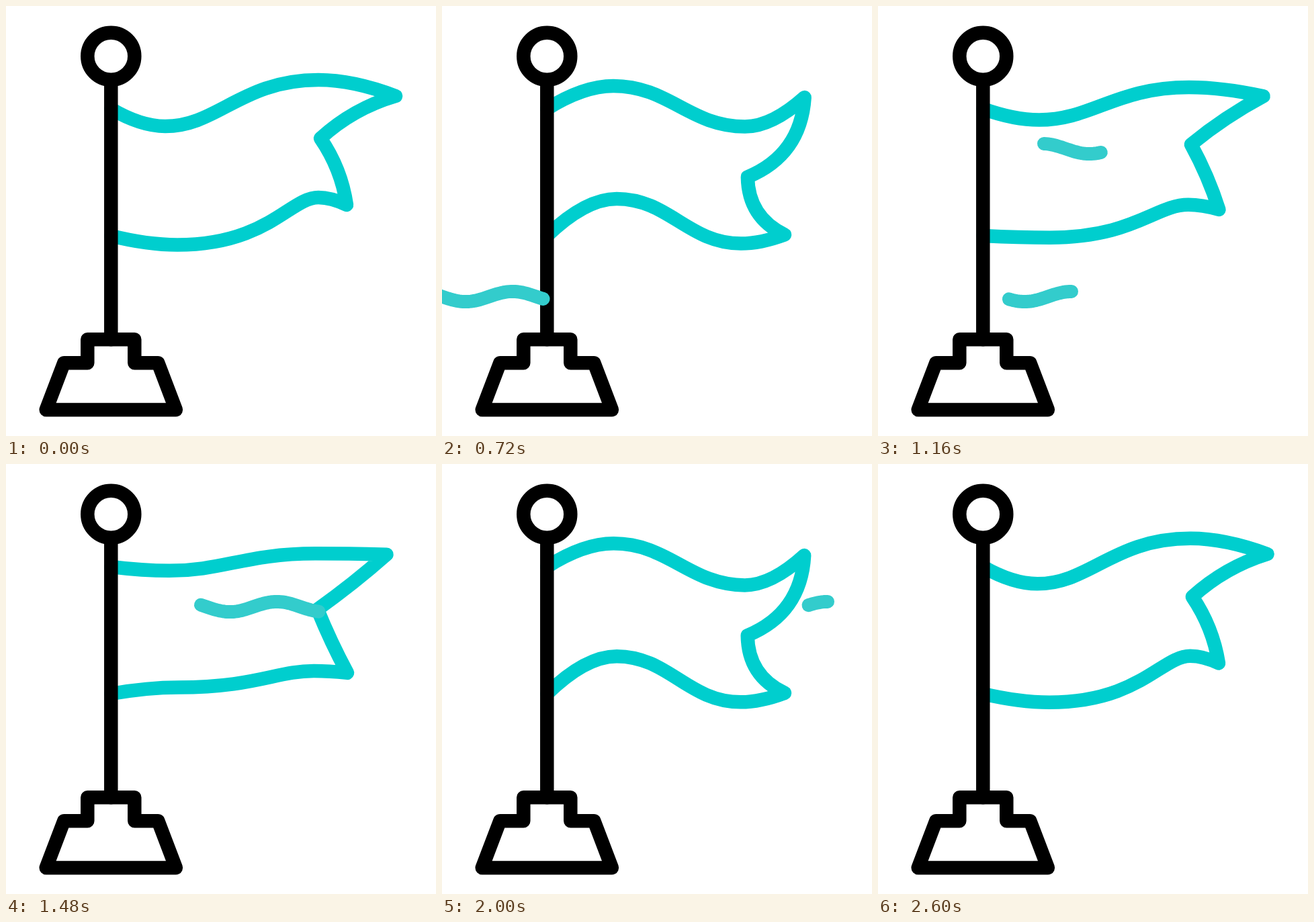
These frames come from a looping animation (640x640 px, 2640 ms). An HTML page with a canvas:

```html
<!DOCTYPE html>
<html lang="en">
<head>
<meta charset="utf-8">
<title>Waving flag</title>
<style>
  html, body { margin: 0; width: 100%; height: 100%; overflow: hidden; background: #fff; }
  canvas { display: block; }
</style>
</head>
<body>
<canvas id="stage" width="640" height="640"></canvas>
<script>
const ctx = document.getElementById('stage').getContext('2d');
const STEP = 40, LOOP = 66, WAVE = 33;
const FLAG = '#00cece', WIND = '#33cccc', INK = '#000';
const MAST = 156.3;

// Where the flag's turning points and corners lie at both ends of its swing.
const raised = {
  topNear: [237, 179], topFar: [465, 110], tip: [580, 134], notch: [468, 197],
  lowTip: [507, 296], lowFar: [465, 285], lowNear: [255, 355.5]
};
const dipped = {
  topNear: [255, 119.5], topFar: [451, 179], tip: [540, 136], notch: [455, 254],
  lowTip: [510, 340], lowFar: [445, 353], lowNear: [260, 287.5]
};

// Each gust draws itself from head to tail along a drifting wave.
const gusts = [
  { from: -50, to: 288, head: [4.5, 28.5], tail: [14.6, 36.6], mid: 432.5, trough: -35, drift: 3.9 },
  { from: 247, to: 574, head: [19.5, 48], tail: [32, 54], mid: 212.5, trough: 247, drift: 2.33 }
];

const clamp = x => Math.min(1, Math.max(0, x));
const smooth = x => x * x * (3 - 2 * x);
const mix = (a, b, k) => a + (b - a) * k;
const mixPoint = (a, b, k) => [mix(a[0], b[0], k), mix(a[1], b[1], k)];
const progress = (frame, [a, b]) => smooth(clamp((frame - a) / (b - a)));

function swing(frame) {
  const c = frame % WAVE;
  const amount = c < 17
    ? 1 - Math.pow(1 - Math.pow(clamp(c / 16), 1.4), 2.6)
    : smooth((WAVE - c) / 16);
  return 1.02 * amount;
}

function stroke(color, width = 20.5) {
  ctx.strokeStyle = color;
  ctx.lineWidth = width;
  ctx.stroke();
}

// Curve between a corner and a turning point, level at the turning point.
function levelOff(corner, turn, end) {
  ctx.quadraticCurveTo(mix(corner[0], turn[0], 0.55), turn[1], ...end);
}

// Curve between two turning points, level at both.
function swell(a, b, lean) {
  ctx.bezierCurveTo(mix(a[0], b[0], 0.42 + lean), a[1],
                    mix(b[0], a[0], 0.42 - lean), b[1], ...b);
}

function bow(a, b, depth) {
  const dx = b[0] - a[0], dy = b[1] - a[1];
  ctx.quadraticCurveTo(a[0] + dx / 2 + 2 * depth * dy,
                       a[1] + dy / 2 - 2 * depth * dx, ...b);
}

function drawFlag(frame) {
  const k = swing(frame), p = {};
  for (const name in raised) p[name] = mixPoint(raised[name], dipped[name], k);
  const top = [MAST, 153], bottom = [MAST, 342];
  const depth = mix(-0.058, 0.153, k);

  ctx.beginPath();
  ctx.moveTo(...top);
  levelOff(top, p.topNear, p.topNear);
  swell(p.topNear, p.topFar, mix(-0.08, 0, k));
  levelOff(p.tip, p.topFar, p.tip);
  bow(p.tip, p.notch, depth);
  bow(p.notch, p.lowTip, -depth);
  levelOff(p.lowTip, p.lowFar, p.lowFar);
  swell(p.lowFar, p.lowNear, mix(-0.22, 0, k));
  levelOff(bottom, p.lowNear, bottom);
  stroke(FLAG);
}

function drawStand() {
  ctx.beginPath();
  ctx.arc(MAST, 74.8, 35, 0, 2 * Math.PI);
  stroke(INK);

  ctx.beginPath();
  ctx.moveTo(MAST, 112);
  ctx.lineTo(MAST, 496.3);
  stroke(INK);

  const half = [[35, 496.3], [35, 531.2], [70, 531.2], [96.6, 601]];
  ctx.beginPath();
  half.forEach(([x, y]) => ctx.lineTo(MAST + x, y));
  half.reverse().forEach(([x, y]) => ctx.lineTo(MAST - x, y));
  ctx.closePath();
  stroke(INK);
}

function drawGust(g, frame) {
  const head = mix(g.from, g.to, progress(frame, g.head));
  const tail = mix(g.from, g.to, progress(frame, g.tail));
  if (head - tail < 0.5) return;
  const trough = g.trough + g.drift * frame;
  const n = Math.ceil((head - tail) / 3);
  ctx.beginPath();
  for (let i = 0; i <= n; i++) {
    const x = mix(tail, head, i / n);
    ctx.lineTo(x, g.mid + 7.6 * Math.cos(2 * Math.PI * (x - trough) / 140));
  }
  stroke(WIND, 20);
}

function draw(ms) {
  const frame = Math.floor(ms / STEP) % LOOP;
  ctx.fillStyle = '#fff';
  ctx.fillRect(0, 0, 640, 640);
  ctx.lineCap = ctx.lineJoin = 'round';
  drawFlag(frame);
  drawStand();
  gusts.forEach(g => drawGust(g, frame));
}

const start = performance.now();
function tick() {
  draw(performance.now() - start);
  requestAnimationFrame(tick);
}
tick();
</script>
</body>
</html>
```
